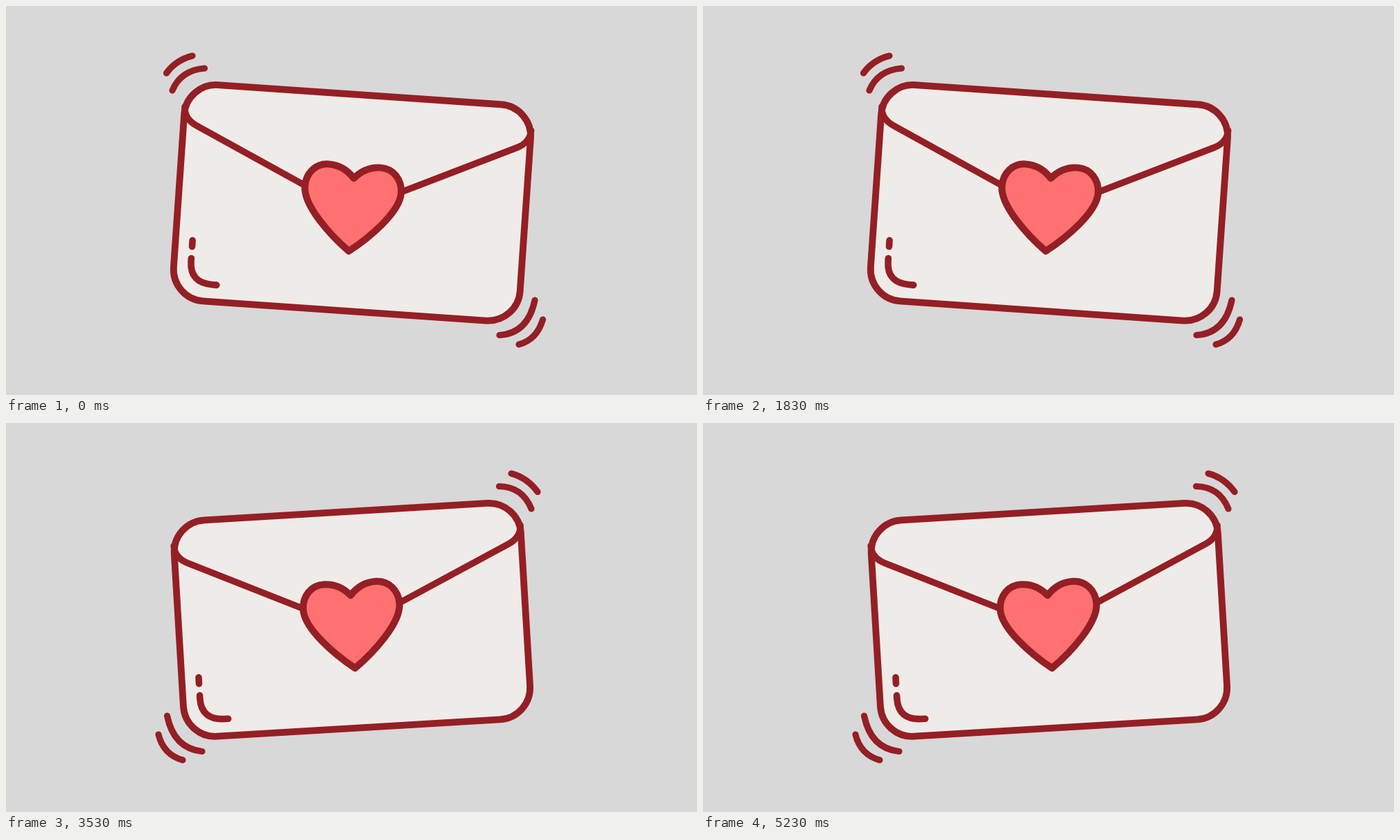
These frames come from a looping animation (997 px wide and 562 px high, 5310 ms). An HTML page with a canvas:

```html
<!DOCTYPE html>
<html lang="en">
<head>
<meta charset="utf-8">
<title>Shaking love letter</title>
<style>
html, body { margin: 0; width: 100%; height: 100%; overflow: hidden; background: #d8d8d8; }
canvas { display: block; }
</style>
</head>
<body>
<canvas id="stage" width="997" height="562"></canvas>
<script>
const ctx = document.getElementById('stage').getContext('2d');
const LOOP = 5310;
const HOLD = LOOP / 14;
const PAPER = '#eeebe8', INK = '#941f25', HEART = '#ff7070';
const DEG = Math.PI / 180;

const heart = new Path2D(
  'M0 -35.4 C-10 -47 -22 -53.4 -37.6 -53.4 C-56 -53.4 -69.6 -38.5 -69.6 -19' +
  ' C-69.6 9 -28 49 0 70 C28 49 69.6 9 69.6 -19' +
  ' C69.6 -38.5 56 -53.4 37.6 -53.4 C22 -53.4 10 -47 0 -35.4 Z');
const flap = new Path2D(
  'M-250.5 -122 Q-250 -104.5 -232 -96 L0 12 L232 -96 Q250 -104.5 250.5 -122');
const shine = new Path2D(
  'M-226 70 V79 M-226 96 V100 C-226 122 -214 132 -192 132 H-187');
const body = new Path2D();
body.roundRect(-250.5, -156.5, 501, 313, 46);

// Each pose: tilt and the shake marks beside the raised corners
const poses = [
  { tilt: 3.95 * DEG, marks: new Path2D(
    'M231.5 97 Q245 78 269 72 M240 122 Q252 93 286.5 90' +
    ' M763 425 Q753 473 712 475.5 M774.5 453 Q766 482 740 489') },
  { tilt: -3.42 * DEG, marks: new Path2D(
    'M729 73 Q752 79 767 99.5 M711.5 91.5 Q745 92 758 124' +
    ' M232.5 423 Q242 470 283 474.5 M220 450 Q227 479 255 487') }
];

function shape(path, fill, width) {
  if (fill) {
    ctx.fillStyle = fill;
    ctx.fill(path);
  }
  ctx.lineWidth = width;
  ctx.stroke(path);
}

function draw(pose) {
  ctx.fillStyle = '#d8d8d8';
  ctx.fillRect(0, 0, 997, 562);
  ctx.strokeStyle = INK;
  ctx.lineCap = ctx.lineJoin = 'round';
  shape(pose.marks, null, 9.2);
  ctx.save();
  ctx.translate(499.4, 284.3);
  ctx.rotate(pose.tilt);
  shape(body, PAPER, 9.8);
  shape(flap, null, 9.4);
  shape(heart, HEART, 10);
  shape(shine, null, 9.6);
  ctx.restore();
}

function tick() {
  const t = performance.now() % LOOP;
  // Step on a 30 fps grid
  const stepped = Math.floor((t + 4) * 0.03) / 0.03;
  draw(poses[Math.min(13, Math.floor(stepped / HOLD)) % 2]);
  requestAnimationFrame(tick);
}
tick();
</script>
</body>
</html>
```
